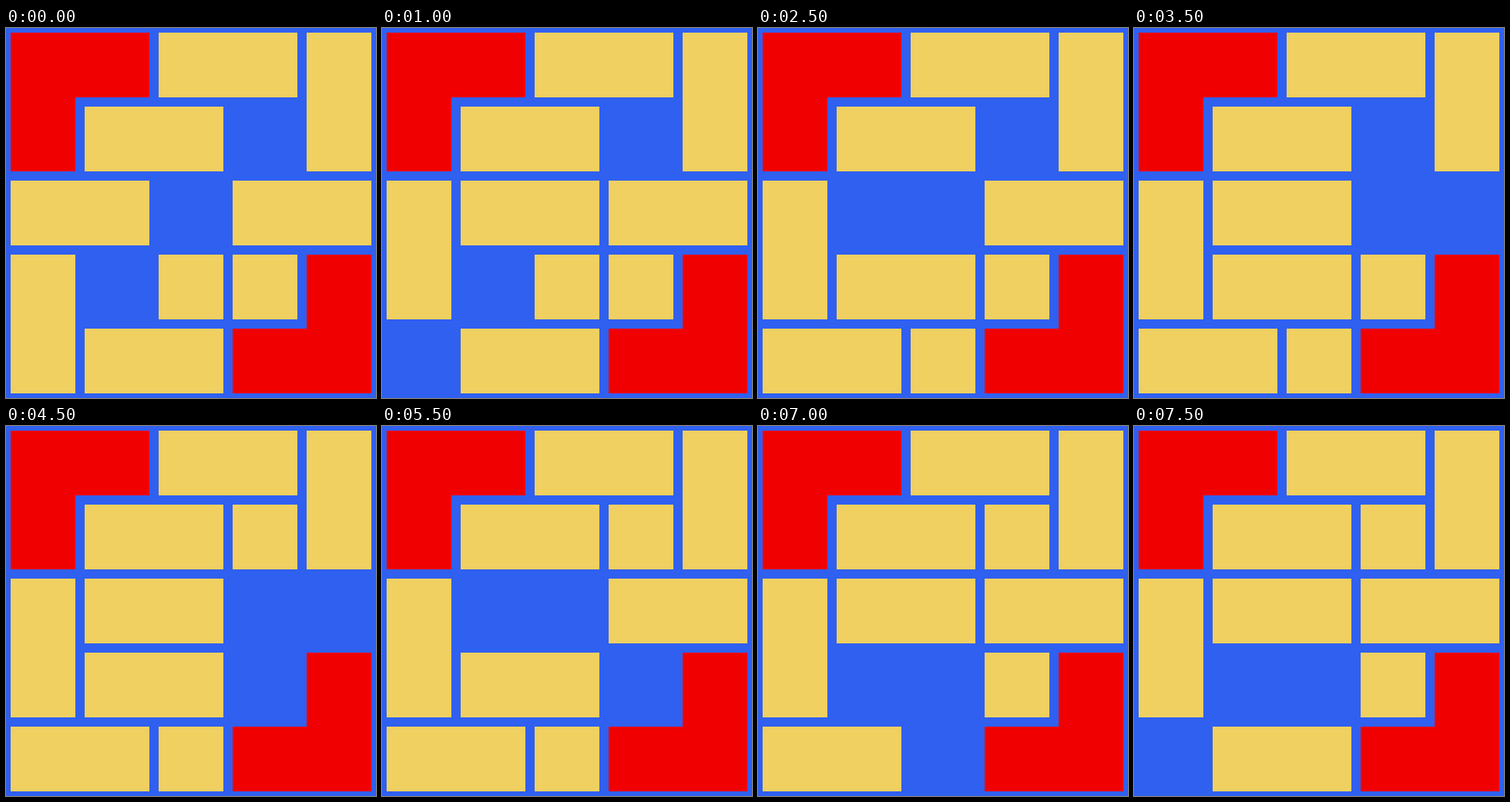
Write an HTML page with a canvas that moves like this. It is 400 px wide and 400 px high and loops after 8000 ms.

```html
<!DOCTYPE html>
<html lang="en">
<head>
<meta charset="utf-8">
<title>Sliding blocks</title>
<style>
html, body { margin: 0; width: 100%; height: 100%; overflow: hidden; background: #3060f0; }
canvas { display: block; }
</style>
</head>
<body>
<canvas id="board" width="400" height="400"></canvas>
<script>
const ctx = document.getElementById('board').getContext('2d');
const CELL = 80, GAP = 10, STEP = 500;

// Each block: column, row, width, height in cells
const start = {
  top: [2, 0, 2, 1], right: [4, 0, 1, 2], upper: [1, 1, 2, 1],
  a: [0, 2, 2, 1], b: [0, 3, 1, 2], c: [1, 4, 2, 1],
  d: [3, 2, 2, 1], s: [2, 3, 1, 1], t: [3, 3, 1, 1]
};

// One move per step: block, then direction
const moves = 'aR bU cL sD aD dL dL tU tU dR dR aU sU sR cR'.split(' ');
const dirs = { L: [-1, 0], R: [1, 0], U: [0, -1], D: [0, 1] };

function blocksAt(step) {
  const blocks = structuredClone(start);
  for (const [id, dir] of moves.slice(0, step)) {
    blocks[id][0] += dirs[dir][0];
    blocks[id][1] += dirs[dir][1];
  }
  return Object.values(blocks);
}

function rect(color, [x, y, w, h]) {
  ctx.fillStyle = color;
  ctx.fillRect(x * CELL + GAP / 2, y * CELL + GAP / 2, w * CELL - GAP, h * CELL - GAP);
}

function draw(step) {
  ctx.fillStyle = '#3060f0';
  ctx.fillRect(0, 0, 400, 400);
  for (const arm of [[0, 0, 2, 1], [0, 0, 1, 2], [4, 3, 1, 2], [3, 4, 2, 1]]) rect('#f00000', arm);
  for (const block of blocksAt(step)) rect('#f0d060', block);
}

function tick() {
  draw(Math.floor(performance.now() / STEP) % (moves.length + 1));
  requestAnimationFrame(tick);
}
tick();
</script>
</body>
</html>
```
